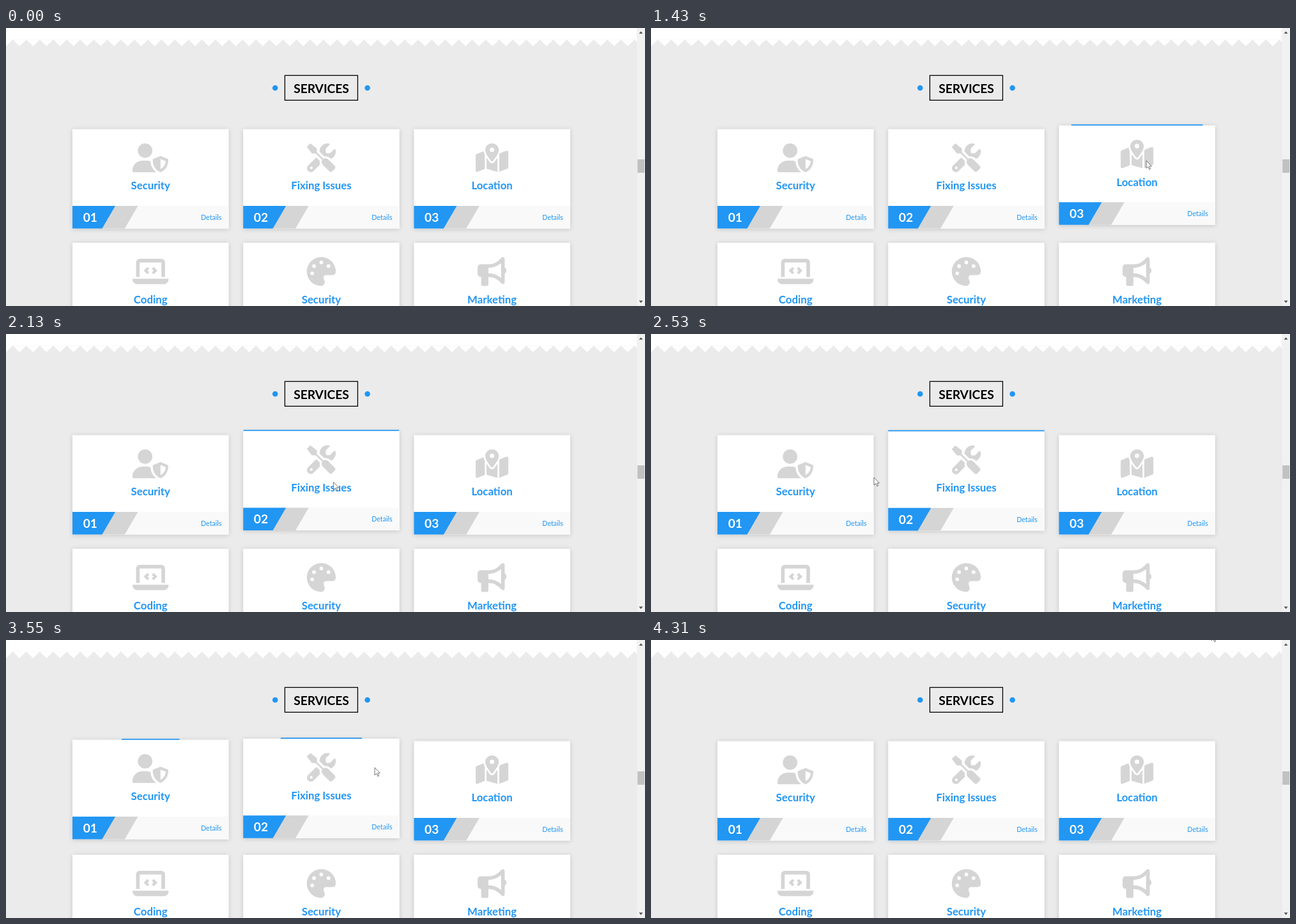
Animation, 1000 px wide and 436 px high, one loop 4410 ms. Source, as an HTML page:

```html
<!DOCTYPE html>
<html lang="en">
<head>
<meta charset="utf-8">
<title>Services</title>
<style>
  html, body { margin: 0; height: 100%; overflow: hidden; background: #ebebeb; }
  svg { display: block; width: 100vw; height: 100vh; }
  text { font: 700 16.8px Lato, "Open Sans", sans-serif; fill: #2196f3; text-anchor: middle; }
  .head { font-size: 19.2px; fill: #000; }
  .num { font-size: 19.2px; fill: #fff; }
  .more { font-size: 10.7px; font-weight: 400; text-anchor: end; }
  .face { fill: #fff; filter: drop-shadow(0 1.3px 3.5px rgba(0, 0, 0, .16)); }
  .icon { fill: #d5d5d5; fill-rule: evenodd; }
  .blue { fill: #2196f3; }
</style>
</head>
<body>
<svg viewBox="0 0 1000 436" preserveAspectRatio="none">
  <rect width="1000" height="436" fill="#ebebeb"/>
  <path id="spikes" fill="#fff"/>
  <rect x="436.4" y="74.4" width="114" height="38.9" fill="none" stroke="#000" stroke-width="1.3"/>
  <text class="head" x="493.5" y="101.7">SERVICES</text>
  <circle class="blue" cx="421.2" cy="94" r="4.3"/>
  <circle class="blue" cx="565.6" cy="94" r="4.3"/>
  <g id="cards"></g>
  <rect x="987.6" width="12.4" height="436" fill="#f1f1f1"/>
  <rect x="988.2" y="206" width="11" height="21" fill="#c1c1c1"/>
  <path d="M990.6 8.8l3-3.6 3 3.6zM990.6 427.6l3 3.6 3-3.6z" fill="#505050"/>
  <path id="cursor" d="M0 0V12L2.8 9.4 4.8 13.8 6.6 13 4.7 8.8H8.3Z" fill="#fff" stroke="#555" stroke-width=".8"/>
</svg>
<script>
const LOOP = 4410, LIFT = 6.6, RISE = 300, WIDE = 244.5, TALL = 156;
const $ = id => document.getElementById(id);
const disc = (x, y, r) => `M${x - r} ${y}a${r} ${r} 0 1 0 ${2 * r} 0 ${r} ${r} 0 1 0 ${-2 * r} 0z`;

// title, icon width, icon outline (512 units tall)
const services = [
  ["Security", 640, disc(224, 128, 128) +
    "M0 482A178 178 0 0 1 178 304h92q32 0 50 18 10 130 103 190H30q-30 0-30-30z" +
    "M496 224L633 278Q640 440 496 512 352 440 359 278zM496 277v181q85-48 92-145z"],
  ["Fixing Issues", 512, disc(80, 432, 24) +
    "M63 0L0 63 90 178h65L270 290q-22 50 14 90L396 492a40 40 0 0 0 56 0l40-40a40 40 0 0 0 0-56L380 284q-40-36-90-14L178 155V90z" +
    "M20 396A68 68 0 0 0 116 492L234 374Q222 340 230 309L168 247z" +
    "M509 114A144 144 0 0 1 429 274L413 259Q370 220 309 230L224 145A144 144 0 0 1 398 3q14 12 0 26L336 91v69l16 16h57L483 102q16-6 26 12z"],
  ["Location", 576, disc(288, 112, 40) +
    "M273 312Q168 180 168 120a120 120 0 0 1 240 0Q408 180 303 312q-15 14-30 0z" +
    "M138 138Q144 170 160 200V452L33 503Q0 509 0 480V210q0-16 15-22zM192 255L248 332q40 40 80 0L384 255V504L192 449z" +
    "M416 200L427 176 543 130Q576 125 576 152V423q0 16-15 22L416 503z"],
  ["Coding", 640,
    "M64 352V96a64 64 0 0 1 64-64H512a64 64 0 0 1 64 64V352H512V96H128V352zM0 384H640a77 96 0 0 1-77 96H77A77 96 0 0 1 0 384z" +
    "M264 175l34 34-31 31 31 31-34 34-65-65zM376 175l-34 34 31 31-31 31 34 34 65-65z"],
  ["Security", 512, disc(96, 288, 32) + disc(128, 160, 32) + disc(256, 96, 32) + disc(384, 160, 32) +
    "M512 256q0 64-70 64H344q-48 0-48 48 0 14 12 40 30 70-42 104H256a256 256 0 1 1 256-256z"],
  ["Marketing", 512,
    "M480 32V180q64 60 0 120V448q-10 60-64 12L382 427Q300 352 201 352H192V480q0 32-32 32H96q-32 0-32-32V352Q0 352 0 288V192Q0 128 64 128H201Q300 128 382 53L425 9q40-26 55 23z" +
    "M416 109V371Q316 288 192 288V192Q316 192 416 109z"]
];

// pointer tip: time, x, y
const path = [
  [130, 945, 440], [830, 926, 117], [1110, 926, 117], [1400, 790, 205], [1706, 638, 236],
  [1820, 624, 237], [2520, 372, 226], [2530, 349, 225], [2940, 260, 222], [3060, 260, 222],
  [3428, 348, 214], [3452, 371, 212], [3550, 577, 200], [3940, 790, 40], [4310, 877, -11]
];

function pointer(t) {
  const k = path.findIndex(p => p[0] >= t);
  if (k < 1) return [-50, -50];
  const [a, ax, ay] = path[k - 1], [b, bx, by] = path[k], f = (t - a) / (b - a);
  return [ax + (bx - ax) * f, ay + (by - ay) * f];
}

const place = i => [104 + i % 3 * 267.2, 158.6 + Math.floor(i / 3) * 178.2];

// spans of time in which the pointer is over a card
function hoverSpans(_, i) {
  const [x, y] = place(i), spans = [];
  let over = false;
  for (let t = 0; t < LOOP; t++) {
    const [px, py] = pointer(t);
    const inside = px >= x && px <= x + WIDE && py >= y && py <= y + TALL;
    if (inside && !over) spans.push([t, LOOP]);
    if (!inside && over) spans.at(-1)[1] = t;
    over = inside;
  }
  return spans;
}
const hovers = services.map(hoverSpans);

const ease = ms => 1 - (1 - Math.min(Math.max(ms / RISE, 0), 1)) ** 2.2;
const raised = (i, t) => Math.max(0, ...hovers[i].map(([a, b]) => ease(t - a) * (1 - ease(t - b))));

let teeth = "M0 0H987.6V18.4H0Z";
for (let x = 0; x < 980; x += 21.15) teeth += `M${x} 18.3v10.2l10.57-10.2 10.58 10.2v-10.2z`;
$("spikes").setAttribute("d", teeth);

$("cards").innerHTML = services.map(([title, w, icon], i) => `
  <g transform="translate(${place(i)})">
    <rect class="face" width="${WIDE}" height="${TALL}"/>
    <rect class="blue" y="-1.6" height="1.7" width="0"/>
    <path class="icon" d="${icon}" transform="translate(${122.2 - w * .0443} 22.4) scale(.0886)"/>
    <text x="122.2" y="94.8">${title}</text>
    <rect y="120.4" width="${WIDE}" height="35.6" fill="#f9f9f9"/>
    <path d="M60 120.4h42.5L81.8 156H40z" fill="#d5d5d5"/>
    <path class="blue" d="M0 120.4H67L46.4 156H0z"/>
    <text class="num" x="27.8" y="145.3">0${i + 1}</text>
    <text class="more" x="233.5" y="142.2">Details</text>
  </g>`).join("");
const cards = [...$("cards").children];

function draw(t) {
  cards.forEach((card, i) => {
    const [x, y] = place(i), bar = card.children[1], wide = WIDE * raised(i, t - 12);
    card.setAttribute("transform", `translate(${x} ${y - LIFT * raised(i, t)})`);
    bar.setAttribute("x", (WIDE - wide) / 2);
    bar.setAttribute("width", wide);
  });
  $("cursor").setAttribute("transform", `translate(${pointer(t)})`);
}

let start;
function tick(now) {
  start ??= now;
  draw((now - start) % LOOP);
  requestAnimationFrame(tick);
}
draw(0);
requestAnimationFrame(tick);
</script>
</body>
</html>
```
